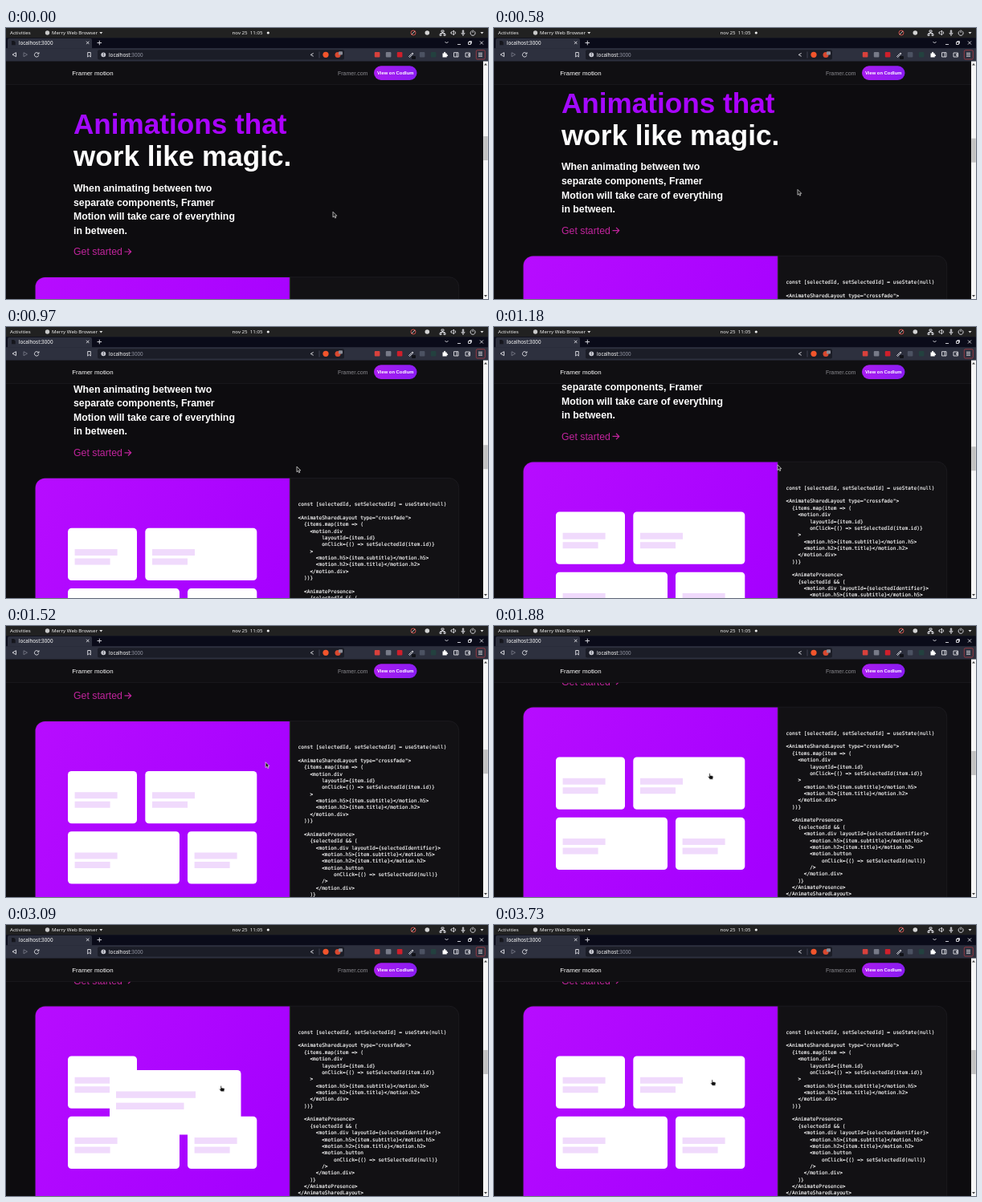
An HTML page for the animation above (3.76 s loop, 600 by 338 pixels).

```html
<!DOCTYPE html>
<html lang="en">
<head>
<meta charset="utf-8">
<title>Scroll and shared layout</title>
<style>
html, body { margin: 0; width: 100%; height: 100%; overflow: hidden; background: #0d0c0f; }
svg { display: block; width: 600px; height: 338px; }
text { font-family: "Liberation Sans", Arial, sans-serif; fill: #fff; white-space: pre; }
.ui text { font: 500 6.3px "Noto Sans", "Open Sans", sans-serif; }
.ui .top text { font-size: 6.15px; fill: #f0f0f0; }
.line { fill: none; stroke: #e2e3e8; stroke-width: .9; }
.h1 { font-size: 35.14px; font-weight: 700; }
.p { font-size: 12.3px; font-weight: 700; }
.link { font-size: 12.3px; fill: #c0249c; }
#code text { font: 6.15px "DejaVu Sans Mono", monospace; stroke: #fff; stroke-width: .14; }
.bar { fill: #f0dafc; }
</style>
</head>
<body>
<svg viewBox="0 0 600 338" xmlns="http://www.w3.org/2000/svg">
  <defs>
    <linearGradient id="violet" x1="0" y1="0" x2="1" y2=".6">
      <stop offset="0" stop-color="#b70cff"/><stop offset="1" stop-color="#a400ff"/>
    </linearGradient>
    <linearGradient id="title"><stop offset="0" stop-color="#a20aff"/><stop offset="1" stop-color="#ae00ff"/></linearGradient>
    <linearGradient id="pill"><stop offset="0" stop-color="#a91cf0"/><stop offset="1" stop-color="#8a1cf2"/></linearGradient>
  </defs>
  <rect width="600" height="338" fill="#0d0c0f"/>

  <g id="page">
    <text class="h1" x="84" y="132" style="fill:url(#title)">Animations that</text>
    <text class="h1" x="84" y="172.4">work like magic.</text>
    <text class="p" x="84" y="203.9">When animating between two</text>
    <text class="p" x="84" y="221.5">separate components, Framer</text>
    <text class="p" x="84" y="239.1">Motion will take care of everything</text>
    <text class="p" x="84" y="256.7">in between.</text>
    <text class="link" x="84" y="283.3">Get started</text>
    <path d="M147.5 279h8M152 275.3l3.7 3.7-3.7 3.7" fill="none" stroke="#c0249c" stroke-width="1.2"/>
    <g transform="translate(0 311)">
      <rect x="36.3" y="-.3" width="527.4" height="300" rx="12" fill="#121114" stroke="#1f1e22" stroke-width=".8"/>
      <path d="M353 0V300H36.6V12a12 12 0 0 1 12-12z" fill="url(#violet)"/>
      <path d="M353.3 0V300" stroke="#39333f"/>
      <g id="code"></g>
      <g id="cards"></g>
      <g id="modal">
        <rect id="sheet" rx="4.6" fill="#fff"/>
        <rect id="bar1" class="bar"/>
        <rect id="bar2" class="bar"/>
        <g id="extras">
          <rect class="bar" x="142" y="140" width="32.6" height="8.2"/>
          <rect class="bar" x="194.3" y="140" width="32.6" height="8.2"/>
          <rect class="bar" x="246.6" y="140" width="32.6" height="8.2"/>
          <circle cx="281.3" cy="90.3" r="4.9" fill="#ebcdfb"/>
          <path d="M279.1 88.1l4.4 4.4m0-4.4l-4.4 4.4" stroke="#7a2aa8" stroke-width=".8"/>
        </g>
      </g>
    </g>
  </g>

  <rect y="41" width="594" height="29.5" fill="#100f12"/>
  <rect y="70" width="594" height=".8" fill="#1b1a1e"/>
  <text x="82.3" y="58.6" font-size="7.9">Framer motion</text>
  <text x="413" y="58.6" font-size="7.03" style="fill:#8b8b90">Framer.com</text>
  <rect x="458" y="47.3" width="53.5" height="17.6" rx="8.8" fill="url(#pill)"/>
  <text x="484.7" y="58.2" font-size="5.86" font-weight="700" text-anchor="middle">View on Codlum</text>

  <rect x="594" y="41" width="6" height="297" fill="#f6f6f6"/>
  <path d="M595 46.5l2-2.6 2 2.6zM595 333l2 2.6 2-2.6z" fill="#444"/>
  <rect id="thumb" x="594.3" y="135" width="5.4" height="30" fill="#c1c1c1"/>

  <g class="ui">
    <rect width="600" height="41.5" fill="#2d303e"/>
    <g class="top">
      <rect width="600" height="12.5" fill="#212121"/>
      <text x="5" y="8.3">Activities</text>
      <circle cx="51.5" cy="6" r="2.7" fill="#c9c9c9"/>
      <text x="57" y="8.3">Merry Web Browser</text>
      <path d="M116.3 5h4l-2 2.4zM590.5 5h4l-2 2.4z" fill="#ddd"/>
      <text x="281.5" y="8.3">nov 25  11:05</text>
      <circle cx="326.3" cy="6" r="1.6" fill="#eee"/>
      <circle cx="507" cy="6" r="3" fill="none" stroke="#c9504c"/>
      <path d="M505 8l4-4" stroke="#ddd" stroke-width=".8"/>
      <circle cx="524.3" cy="6" r="2.8" fill="#d4d4d4"/>
      <g class="line">
        <path d="M542 3h3v2h-3zM540 7.5h2v2h-2zM545 7.5h2v2h-2zM543.5 5v1.5m-2.5 1v-1h5v1"/>
        <path d="M554 5h1.5l2-2v6l-2-2H554zM559 4.3q1.5 1.7 0 3.4"/>
        <path d="M568.3 3h1.4v3.5h-1.4zM567 6q0 2 2 2t2-2M569 8v2"/>
        <path d="M579.7 3.7a3 3 0 1 0 2.8 0M581.1 2.5v3.5"/>
      </g>
    </g>

    <rect y="12.3" width="600" height="12.9" fill="#0a0b19"/>
    <path d="M2 25.5V15q0-2 2-2H105q2 0 2 2V25.5z" fill="#2d303e"/>
    <path d="M7 16h3l1.7 1.7V21.3H7z" fill="#15161d"/>
    <text x="15.8" y="20.6">localhost:3000</text>
    <g class="line">
      <path d="M100 16.7l3.4 3.4m0-3.4l-3.4 3.4M113.5 18.5h5.6M116.3 15.7v5.6"/>
      <path d="M546.5 17l2 2 2-2M562 20.5h4M575.5 17.5h3v3h-3zM576.5 16.5h3v3M590 16.5l4 4m0-4l-4 4"/>
    </g>

    <rect x="114" y="27.2" width="307" height="12.3" rx="2" fill="#1b1d27"/>
    <g class="line">
      <path d="M12.5 30.7v5l-4.5-2.5z"/>
      <path d="M22 30.7v5l4.5-2.5z" stroke="#747784"/>
      <path d="M40.3 31.8a2.7 2.7 0 1 0 .4 2.3M41 30.3v2h-2M101.7 30.5h3.6v5.6l-1.8-1.6-1.8 1.6z"/>
      <path d="M382.7 31.5l-3.5 1.9 3.5 1.9"/>
    </g>
    <circle cx="121.3" cy="33.3" r="2.9" fill="#c9cad2"/>
    <path d="M121.3 31.5v1.8m0 .8v.9" stroke="#1b1d27" stroke-width=".8"/>
    <text x="128" y="35.5">localhost<tspan fill="#9698a5">:3000</tspan></text>
    <path d="M390 29.5v8" stroke="#555866" stroke-width=".7"/>
    <circle cx="398" cy="33.3" r="3.6" fill="#f2552c"/>
    <circle cx="413" cy="33.6" r="3.5" fill="#d8482f"/>
    <rect x="414" y="29.3" width="5" height="4.3" rx="1" fill="#8b8d98"/>
    <g id="tools"></g>
    <g class="line">
      <path d="M501.5 35.5l4.5-4.5 1 1-4.5 4.5z"/>
      <path d="M557.5 30.7h5.5v5.3h-5.5zM561 30.7v5.3M572 31h5.5v5H572zM575.5 32.7h2v1.6h-2z"/>
      <path d="M588 31.3h5M588 33.3h5M588 35.3h5"/>
    </g>
    <path d="M543.5 31.5h1.6q-.3-1.7 1-1.7t1 1.7h1.6v1.7q1.5 0 1.5 1t-1.5 1v1.4h-5.2z" fill="#fff"/>
    <rect x="585.3" y="27.7" width="11" height="11.3" rx="1.5" fill="none" stroke="#a03a43" stroke-width=".9"/>
  </g>

  <g id="cursor" stroke="#e8e8e8" stroke-width=".7" stroke-linejoin="round">
    <path id="arrow" d="M0 0v6.8l1.6-1.4 1.1 2.4 1.1-.5-1-2.4h2z" fill="#151515"/>
    <path id="hand" d="M0 .2q.8-.7 1.3.2v2l3 .6q.9.3.8 1.3l-.5 3H.8L-1.6 4.2q.5-1 1.6 0z" fill="#111"/>
  </g>
</svg>

<script>
const LOOP = 3760, NOTCH = 17.46, NOTCH_MS = 120;
const OPEN = 1905, CLOSE = 3088, MORPH_MS = 450;
const $ = id => document.getElementById(id);
const clamp = v => Math.max(0, Math.min(1, v));
const lerp = (a, b, k) => a + (b - a) * k;
const mix = (a, b, k) => a.map((v, i) => lerp(v, b[i], k));

function add(parent, tag, attrs, label = "") {
  const el = document.createElementNS("http://www.w3.org/2000/svg", tag);
  for (const key in attrs) el.setAttribute(key, attrs[key]);
  el.textContent = label;
  return parent.appendChild(el);
}

function place(el, [x, y, width, height]) {
  for (const [key, v] of Object.entries({ x, y, width, height })) el.setAttribute(key, v);
}

const code = `const [selectedId, setSelectedId] = useState(null)

<AnimateSharedLayout type="crossfade">
  {items.map(item => (
    <motion.div
        layoutId={item.id}
        onClick={() => setSelectedId(item.id)}
    >
      <motion.h5>{item.subtitle}</motion.h5>
      <motion.h2>{item.title}</motion.h2>
    </motion.div>
  ))}

  <AnimatePresence>
    {selectedId && (
      <motion.div layoutId={selectedIdentifier}>
        <motion.h5>{item.subtitle}</motion.h5>
        <motion.h2>{item.title}</motion.h2>
        <motion.button
            onClick={() => setSelectedId(null)}
        />
      </motion.div>
    )}
  </AnimatePresence>
</AnimateSharedLayout>`;
code.split("\n").forEach((line, i) => add($("code"), "text", { x: 363.6, y: 34.3 + i * 8.36 }, line));

for (const [x, y, width] of [[77, 62, 86], [77, 137.3, 139], [226, 137.3, 86.3]]) {
  add($("cards"), "rect", { x, y, width, height: 65.3, rx: 4.6, fill: "#fff" });
  add($("cards"), "rect", { x: x + 8.6, y: y + 26.3, width: 53, height: 8, class: "bar" });
  add($("cards"), "rect", { x: x + 8.6, y: y + 37.8, width: 44, height: 8, class: "bar" });
}

["#d8413c", "#777a88", "#d01f2b", "", "#4c5262", "#23413f"].forEach((fill, i) => {
  if (fill) add($("tools"), "rect", { x: 458.8 + i * 14, y: 30, width: 6.6, height: 6.6, rx: 1, fill });
});
add($("tools"), "rect", { x: 505, y: 35, width: 5, height: 4, rx: 1, fill: "#111218" });

// Cubic bezier (.4, 0, .1, 1), solved by bisection
function ease(x) {
  if (x <= 0 || x >= 1) return clamp(x);
  let lo = 0, hi = 1, u;
  for (let i = 0; i < 22; i++) {
    u = (lo + hi) / 2;
    const v = 1 - u;
    if (1.2 * v * v * u + .3 * v * u * u + u ** 3 < x) lo = u; else hi = u;
  }
  return u * u * (3 - 2 * u);
}

const wheel = [300, 520, 600, 660, 720, 780, 840, 1060, 1150, 1240, 1330, 1525];
const scrollAt = t => NOTCH * wheel.reduce((sum, start) => {
  const k = clamp((t - start) / NOTCH_MS);
  return sum + k * k * (3 - 2 * k);
}, 0);

// Time, x, y of the pointer tip
const route = [[0, 407, 229.3], [200, 405, 227], [580, 378, 201.5], [970, 362, 174], [1250, 350, 171], [1520, 323.3, 169.7],
  [1850, 268, 184], [2240, 266, 183], [2600, 269, 185], [2850, 281, 190], [2960, 281, 191],
  [3090, 267, 200.5], [3300, 268, 199], [3600, 271, 193], [LOOP, 271, 193]];

function pointerAt(t) {
  const i = route.findIndex(p => p[0] > t);
  const a = route[i - 1], b = route[i], k = (t - a[0]) / (b[0] - a[0]);
  return [lerp(a[1], b[1], k), lerp(a[2], b[2], k)];
}

const shapes = {
  sheet: [[173.3, 62, 139, 65.3], [129, 79.5, 163.5, 80.5]],
  bar1: [[182, 88.3, 53, 8], [137, 106, 99, 8.3]],
  bar2: [[182, 99.8, 44, 8], [137, 120.2, 84.5, 8.3]]
};

function draw(t) {
  const scroll = scrollAt(t);
  $("page").setAttribute("transform", `translate(0 ${-scroll})`);
  $("thumb").setAttribute("y", 135 + scroll * .1);

  const open = t >= OPEN && t < CLOSE;
  const k = t < CLOSE ? ease((t - OPEN) / MORPH_MS) : 1 - ease((t - CLOSE) / MORPH_MS);
  for (const id in shapes) place($(id), mix(...shapes[id], k));

  const full = shapes.sheet[1], [x, y, w, h] = mix(...shapes.sheet, k);
  $("extras").setAttribute("transform",
    `translate(${x} ${y}) scale(${w / full[2]} ${h / full[3]}) translate(${-full[0]} ${-full[1]})`);
  $("extras").style.display = open ? "" : "none";
  $("cards").setAttribute("opacity", open ? .42 : 1);

  const [px, py] = pointerAt(t);
  const hand = (px < 312 && t > 1580 && t < OPEN) || t > 2800;
  $("cursor").setAttribute("transform", `translate(${px} ${py})`);
  $("arrow").style.display = hand ? "none" : "";
  $("hand").style.display = hand ? "" : "none";
}

function tick() {
  draw(performance.now() % LOOP);
  requestAnimationFrame(tick);
}
tick();
</script>
</body>
</html>
```
